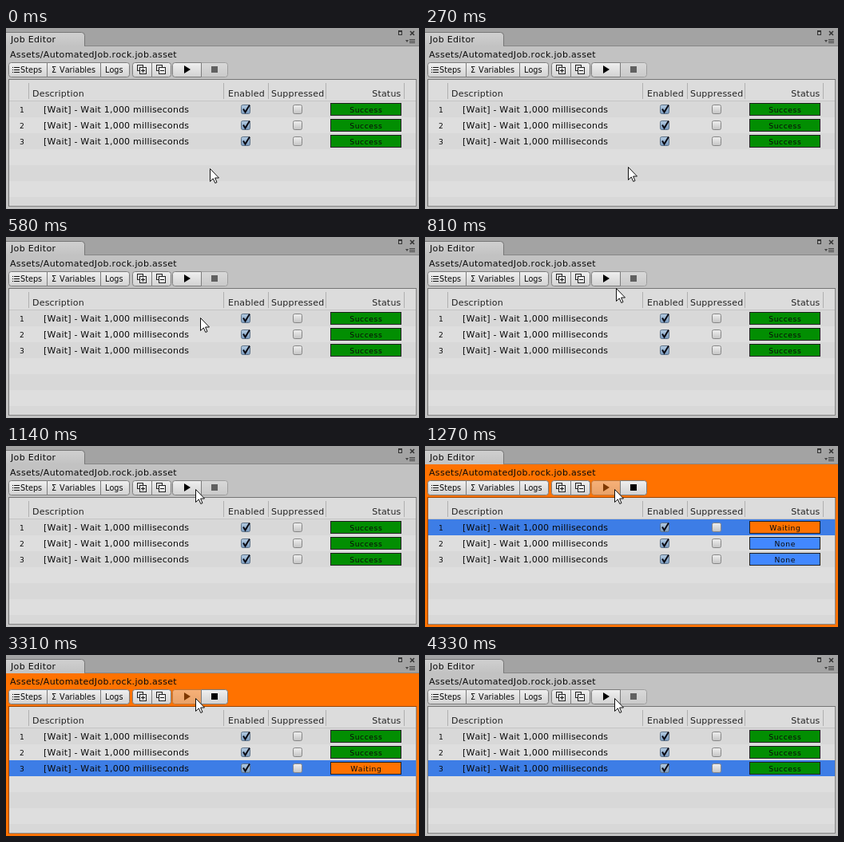
Animation, 517 px wide and 227 px high, one loop 4.97 s. Source, as an HTML page:

```html
<!DOCTYPE html>
<html lang="en">
<head>
<meta charset="utf-8">
<title>Job Editor</title>
<style>
html, body { margin: 0; width: 517px; height: 227px; overflow: hidden; }
svg { display: block; }
rect, line { shape-rendering: crispEdges; }
.round { shape-rendering: auto; }
text { font: 11px "DejaVu Sans", Verdana, sans-serif; letter-spacing: .2px; font-kerning: none; fill: #0a0a0a; white-space: pre; }
.wide { letter-spacing: .33px; }
.head { fill: #222; }
.tool { font-size: 9.7px; letter-spacing: 0; }
.num { font-size: 9.2px; letter-spacing: 0; }
.status { font-size: 9.2px; letter-spacing: .6px; text-anchor: middle; }
.end { text-anchor: end; }
</style>
</head>
<body>
<svg id="stage" width="517" height="227" viewBox="0 0 517 227"></svg>
<script>
const LOOP = 4970;
const GREY = '#c2c2c2', ORANGE = '#ff7200', SELECTED = '#3d7de6';
const STATUS = { Success: '#028e02', Waiting: ORANGE, None: '#4288ff' };

// start time, selected row, running, status of each row
const STATES = [
  [0, -1, false, ['Success', 'Success', 'Success']],
  [1270, 0, true, ['Waiting', 'None', 'None']],
  [2290, 1, true, ['Success', 'Waiting', 'None']],
  [3310, 2, true, ['Success', 'Success', 'Waiting']],
  [4330, 2, false, ['Success', 'Success', 'Success']]
];

// pointer positions, one every 45 ms once it starts to move
const MOVE_START = 270, MOVE_STEP = 45;
const PATH_X = [255, 254, 252, 250, 248, 246, 245, 244, 243, 242, 241, 241, 240, 239, 239, 238, 238, 237];
const PATH_Y = [176, 174, 168, 159, 148, 136, 124, 112, 101, 91, 82, 75, 69, 64, 60, 57, 55, 54];

const rect = (x, y, w, h, fill, more = '') =>
  `<rect x="${x}" y="${y}" width="${w}" height="${h}" fill="${fill}" ${more}/>`;
const text = (x, y, str, cls = '') => `<text x="${x}" y="${y}" class="${cls}">${str}</text>`;
const path = (d, fill, more = '') => `<path d="${d}" fill="${fill}" ${more}/>`;
const vline = (x, y, h, color) => rect(x, y, 1, h, color);
const rowY = i => 92 + i * 20;

function gradient(id, top, bottom) {
  return `<linearGradient id="${id}" x2="0" y2="1"><stop stop-color="${top}"/><stop offset="1" stop-color="${bottom}"/></linearGradient>`;
}

// button with optional rounding on its left and right side
function button(x, w, left, right) {
  const l = left ? 3 : 0, r = right ? 3 : 0, x0 = x + .5, x1 = x + w + .5;
  const d = `M${x0 + l} 43.5H${x1 - r}q${r} 0 ${r} ${r}V${61.5 - r}q0 ${r} ${-r} ${r}H${x0 + l}` +
    `q${-l} 0 ${-l} ${-l}V${43.5 + l}q0 ${-l} ${l} ${-l}Z`;
  return path(d, 'url(#btn)', 'stroke="#7c7c7c"');
}

function listIcon(x, y) {
  return [0, 3, 6].map(d => rect(x, y + d, 1, 1, '#111') + rect(x + 2, y + d, 7, 1, '#111')).join('');
}

function foldIcon(x, plus) {
  const box = 'stroke="#222"';
  return rect(x + .5, 46.5, 7, 7, '#ddd', box) +
    rect(x + 3.5, 49.5, 8, 8, '#eee', box) +
    rect(x + 5, 53, 5, 1, '#111') + (plus ? rect(x + 7, 51, 1, 5, '#111') : '');
}

function chrome() {
  return rect(0, 0, 517, 23, '#a3a3a3') +
    rect(98, 22, 419, 1, '#868686') +
    path('M0 23V5.5H94.500q3.500 0 3.500 3.500V23Z', 'url(#tab)') +
    path('M0 5.500H94.500q4 0 4 4V22.500', 'none', 'stroke="#777"') +
    text(6, 18, 'Job Editor', 'wide') +
    rect(491.5, 4.5, 4, 4, 'none', 'stroke="#333"') + rect(491, 3, 5, 2, '#333') +
    path('M506 4l5 5M511 4l-5 5', 'none', 'stroke="#333" stroke-width="1.5"') +
    path('M500 15h4l-2 3z', '#444') +
    [14, 16, 18].map(y => rect(505, y, 7, 1, '#444')).join('');
}

function toolbar() {
  return text(5, 37, 'Assets/AutomatedJob.rock.job.asset', 'wide') +
    button(3, 48, true, false) + button(51, 67, false, false) + button(118, 36, false, true) +
    listIcon(8, 49) + text(18, 56, 'Steps', 'tool') +
    text(57, 56, 'Σ', 'tool') + text(67, 56, 'Variables', 'tool') + text(124, 56, 'Logs', 'tool') +
    button(158, 24, true, false) + button(182, 24, false, true) +
    foldIcon(164, true) + foldIcon(188, false) +
    `<g id="play">${button(208, 36, true, false)}${path('M223 47l8 5-8 5z', '#000')}</g>` +
    `<g id="stop">${button(244, 33, false, true)}${rect(257, 48, 8, 8, '#000')}</g>`;
}

function checkbox(x, y, on) {
  return rect(x + .5, y + .5, 11, 11, on ? 'url(#on)' : 'url(#off)',
    `rx="2" class="round" stroke="${on ? '#5d7187' : '#858585'}"`) +
    (on ? path(`M${x + 3} ${y + 5.5}l2.500 4 5.500-9`, 'none', 'stroke="#0a0a14" stroke-width="2"') : '');
}

function row(i) {
  const y = rowY(i);
  return text(17, y + 14, i + 1, 'num') +
    text(47, y + 14, '[Wait] - Wait 1,000 milliseconds') +
    checkbox(294, y + 4, true) + checkbox(359, y + 4, false) +
    rect(406.5, y + 2.5, 88, 15, STATUS.Success, `id="cell${i}" stroke="#202020"`) +
    `<text id="label${i}" class="status" x="450.8" y="${y + 14}"></text>`;
}

function table() {
  let out = rect(3.5, 64.5, 510, 159, '#dcdcdc', 'stroke="#000" stroke-opacity=".4"');
  for (let y = 92, i = 0; y < 223; y += 20, i++)
    out += rect(4, y, 509, Math.min(20, 223 - y), i % 2 ? '#dedede' : '#d8d8d8');
  out += rect(4, 91, 509, 1, '#c4c4c4');
  for (const x of [28, 272, 328, 400, 498]) out += vline(x, 69, 20, '#b0b0b0');
  out += text(33, 86, 'Description', 'head') + text(278, 86, 'Enabled', 'head') +
    text(332, 86, 'Suppressed', 'head') + text(494.5, 86, 'Status', 'head end');
  out += rect(4, 0, 509, 20, SELECTED, 'id="selection"');
  return out + [0, 1, 2].map(row).join('');
}

const pointer = '<g id="pointer">' +
  path('M.5 .5V16.500L4.300 12.900L6.800 18.500L9 17.500L6.600 12H11.500Z', '#fff', 'stroke="#111"') + '</g>';

document.getElementById('stage').innerHTML =
  '<defs>' + gradient('btn', '#f0f0f0', '#d2d2d2') + gradient('tab', '#d0d0d0', GREY) +
  gradient('on', '#b4cce2', '#7899bd') + gradient('off', '#f0f0f0', '#c4c4c4') + '</defs>' +
  rect(0, 22, 517, 205, GREY, 'id="body"') + chrome() + toolbar() + table() + pointer;

const set = (id, name, value) => document.getElementById(id).setAttribute(name, value);
let shown = null;

function applyState(state) {
  if (state === shown) return;
  shown = state;
  const [, selected, running, statuses] = state;
  set('body', 'fill', running ? ORANGE : GREY);
  set('play', 'opacity', running ? .5 : 1);
  set('stop', 'opacity', running ? 1 : .5);
  set('selection', 'visibility', selected < 0 ? 'hidden' : 'visible');
  set('selection', 'y', rowY(Math.max(0, selected)));
  statuses.forEach((name, i) => {
    set('cell' + i, 'fill', STATUS[name]);
    document.getElementById('label' + i).textContent = name;
  });
}

function pointerStep(t) {
  if (t < MOVE_START) return 0;
  // steps land on whole hundredths of a second
  const n = Math.floor((t - MOVE_START + 5) / MOVE_STEP) + 1;
  return Math.min(n, PATH_X.length - 1);
}

function draw() {
  const t = performance.now() % LOOP;
  applyState(STATES.filter(s => s[0] <= t).pop());
  const n = pointerStep(t);
  set('pointer', 'transform', `translate(${PATH_X[n]} ${PATH_Y[n]})`);
  requestAnimationFrame(draw);
}
draw();
</script>
</body>
</html>
```
